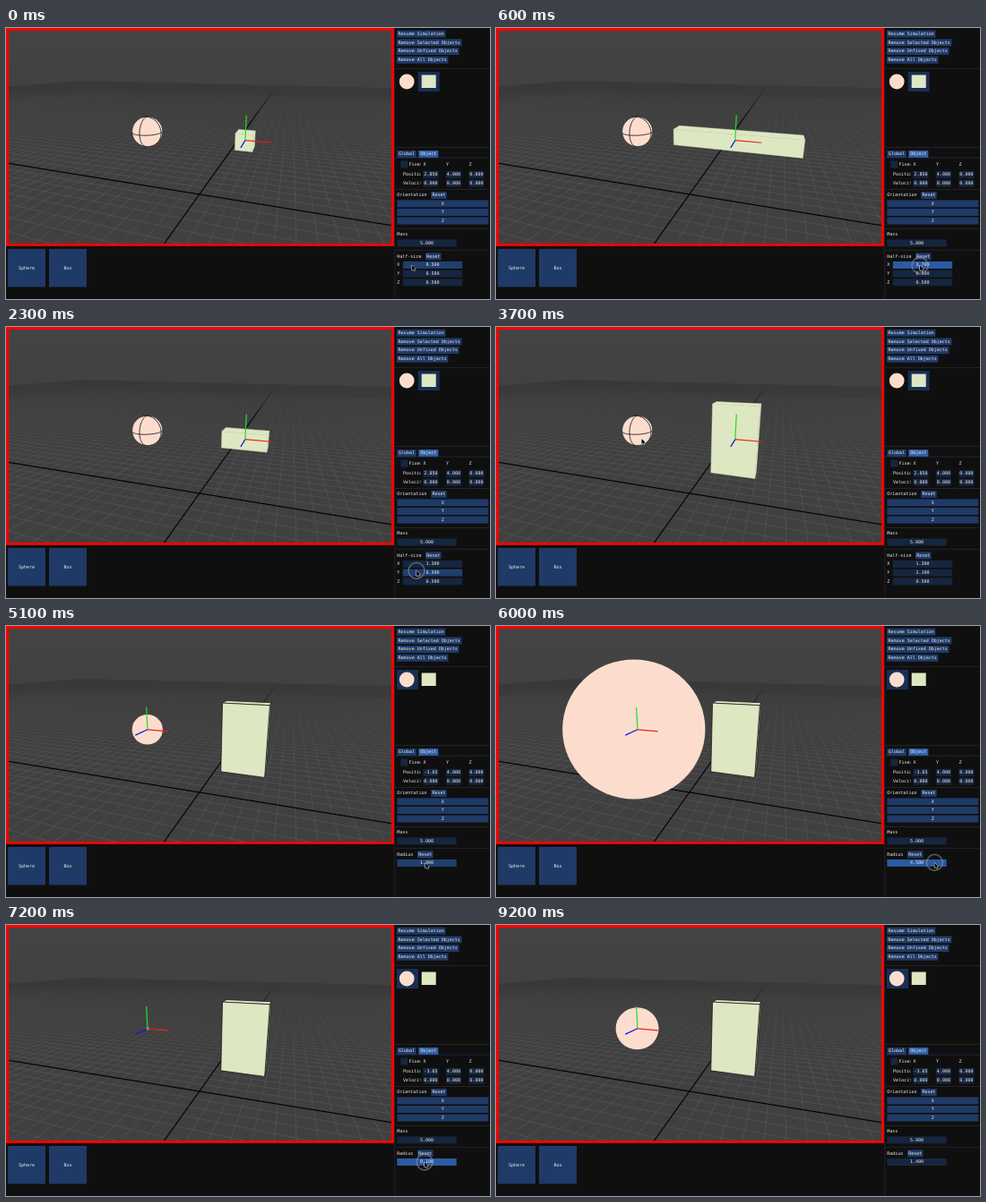
An HTML page with a canvas that plays this animation: 540 by 303 pixels, repeating every 9300 ms.

```html
<!DOCTYPE html>
<html>
<head>
<meta charset="utf-8">
<title>Physics sandbox</title>
<style>
html, body { margin: 0; width: 100%; height: 100%; overflow: hidden; background: #0f0f0f; }
canvas { display: block; width: 540px; height: 303px; }
</style>
</head>
<body>
<canvas id="stage"></canvas>
<script>
const W = 540, H = 303, LOOP = 9300, STEP = 100;
const ratio = window.devicePixelRatio || 1;
const stage = document.getElementById('stage');
const BUTTON = '#1f3a66', FIELD = '#16263f', HOVER = '#203f6e', ACTIVE = '#2b5aa3';
const PEACH = '#fcddcd', GREEN = '#dde7c2';

function sized(canvas) {
  canvas.width = W * ratio;
  canvas.height = H * ratio;
  const c = canvas.getContext('2d');
  c.scale(ratio, ratio);
  return c;
}
const ctx = sized(stage);

// Camera orbiting the point (0, 4, 0)
const FOCAL = 292, DIST = 16.3, CX = 215.8, CY = 121;
const yaw = 18.8 * Math.PI / 180, pitch = 15.3 * Math.PI / 180;
const sy = Math.sin(yaw), cy = Math.cos(yaw), sp = Math.sin(pitch), cp = Math.cos(pitch);
const eye = [DIST * sy * cp, 4 + DIST * sp, DIST * cy * cp];

function view([x, y, z]) {
  const ahead = -x * sy - z * cy, up = y - 4;
  return [x * cy - z * sy, ahead * sp + up * cp, DIST + ahead * cp - up * sp];
}
const toScreen = ([x, y, d]) => [CX + FOCAL * x / d, CY - FOCAL * y / d];
const project = p => toScreen(view(p));

function path(c, points, closed) {
  c.beginPath();
  points.forEach(p => c.lineTo(p[0], p[1]));
  if (closed) c.closePath();
}

// Line on the ground, cut at the near plane
function groundLine(c, a, b) {
  let p = view(a), q = view(b);
  const near = 1;
  if (p[2] < near && q[2] < near) return;
  const cut = (u, v) => {
    const k = (near - u[2]) / (v[2] - u[2]);
    return u.map((n, i) => n + (v[i] - n) * k);
  };
  if (p[2] < near) p = cut(p, q);
  if (q[2] < near) q = cut(q, p);
  path(c, [toScreen(p), toScreen(q)]);
  c.stroke();
}

function fade(c, y0, y1, from, to) {
  const g = c.createLinearGradient(0, y0, 0, y1);
  g.addColorStop(0, from);
  g.addColorStop(1, to);
  return g;
}

function makeScene() {
  const canvas = document.createElement('canvas');
  const c = sized(canvas);
  c.fillStyle = fade(c, 0, 70, '#444444', '#414141');
  c.fillRect(0, 0, 433, 244);
  const size = 100;
  const left = project([-size, 0, 15]), corner = project([-size, 0, -size]), right = project([size, 0, -size]);
  path(c, [left, corner, right, [right[0], 244], [left[0], 244]], true);
  c.fillStyle = fade(c, 58, 150, '#383838', '#404040');
  c.save();
  c.clip();
  c.fillRect(0, 0, 433, 244);
  c.lineWidth = 0.6;
  c.strokeStyle = fade(c, 68, 165, 'rgba(92,92,92,0)', 'rgba(92,92,92,0.85)');
  for (let i = -60; i <= 60; i++) {
    groundLine(c, [i, 0, -size], [i, 0, size]);
    groundLine(c, [-size, 0, i], [size, 0, i]);
  }
  c.lineWidth = 1.2;
  c.strokeStyle = fade(c, 66, 105, 'rgba(0,0,0,0)', '#000');
  groundLine(c, [-size, 0, 0], [size, 0, 0]);
  groundLine(c, [0, 0, -size], [0, 0, size]);
  c.restore();
  return canvas;
}
const scene = makeScene();

// Timeline
const smooth = k => k * k * (3 - 2 * k);
function track(keys, t) {
  if (t <= keys[0][0]) return keys[0].slice(1);
  for (let i = 1; i < keys.length; i++) {
    const a = keys[i - 1], b = keys[i];
    if (t <= b[0]) {
      const k = smooth((t - a[0]) / (b[0] - a[0]));
      return a.slice(1).map((v, n) => v + (b[n + 1] - v) * k);
    }
  }
  return keys[keys.length - 1].slice(1);
}
const tenth = keys => t => Math.round(track(keys, t)[0] * 10) / 10;
const halfX = tenth([[100, 0.5], [600, 3.7], [800, 4], [1700, 1.3]]);
const halfY = tenth([[2300, 0.5], [2800, 2.6], [3200, 2.1]]);
const radius = tenth([[5100, 1], [6000, 4.5], [7200, 0.1], [8300, 1.4]]);
const pointer = [
  [0, 453, 265], [100, 453, 265], [600, 473, 265.5], [800, 475, 265.5], [1700, 458, 265.5],
  [2000, 458, 272.5], [2300, 458, 272.5], [2800, 471, 273], [3200, 468, 273],
  [3700, 162.5, 125], [4100, 162.5, 125], [4900, 468, 265], [5100, 468, 265],
  [6000, 489.4, 264.5], [7200, 467, 265], [8300, 475, 265], [8500, 475, 265], [9100, 515, -14]
];
const presses = [[100, 1700], [2250, 3200], [3900, 4050], [5100, 8300]];
const pressed = t => presses.some(([a, b]) => t > a && t < b);
const SELECT_AT = 4000;
const BOX_AT = [2.85, 4, 0], BALL_AT = [-3.65, 4, 0];

function drawBox(half, selected) {
  ctx.lineJoin = 'round';
  for (let axis = 0; axis < 3; axis++) {
    for (const side of [-1, 1]) {
      if ((eye[axis] - BOX_AT[axis]) * side <= half[axis]) continue;
      const u = (axis + 1) % 3, v = (axis + 2) % 3;
      const corners = [[-1, -1], [1, -1], [1, 1], [-1, 1]].map(([a, b]) => {
        const p = BOX_AT.slice();
        p[axis] += side * half[axis];
        p[u] += a * half[u];
        p[v] += b * half[v];
        return project(p);
      });
      path(ctx, corners, true);
      ctx.fillStyle = GREEN;
      ctx.fill();
      ctx.lineWidth = selected ? 0.4 : 0.7;
      ctx.strokeStyle = selected ? GREEN : '#111';
      ctx.stroke();
    }
  }
}

function drawBall(r, selected) {
  const [x, y, d] = view(BALL_AT);
  const q = d * d - r * r, k = d * d / q;
  const rx = FOCAL * r * Math.sqrt(x * x + q) / q, ry = FOCAL * r * Math.sqrt(y * y + q) / q;
  ctx.beginPath();
  ctx.ellipse(CX + FOCAL * x / d * k, CY - FOCAL * y / d * k, rx, ry, 0, 0, 7);
  ctx.fillStyle = PEACH;
  ctx.fill();
  if (selected) return;
  ctx.strokeStyle = '#222';
  ctx.lineWidth = 0.7;
  ctx.stroke();
  ctx.lineWidth = 0.9;
  for (let axis = 0; axis < 3; axis++) {
    ctx.beginPath();
    let pen = false;
    for (let i = 0; i <= 72; i++) {
      const a = i * Math.PI / 36, p = BALL_AT.slice();
      p[(axis + 1) % 3] += r * Math.cos(a);
      p[(axis + 2) % 3] += r * Math.sin(a);
      const facing = p.reduce((s, n, j) => s + (n - BALL_AT[j]) * (eye[j] - p[j]), 0) > 0;
      const s = project(p);
      if (facing && pen) ctx.lineTo(s[0], s[1]);
      else ctx.moveTo(s[0], s[1]);
      pen = facing;
    }
    ctx.stroke();
  }
}

function drawGizmo(at) {
  ctx.lineWidth = 1.2;
  ['#f02018', '#20e020', '#1414e0'].forEach((color, axis) => {
    const tip = at.slice();
    tip[axis] += 1.5;
    path(ctx, [project(at), project(tip)]);
    ctx.strokeStyle = color;
    ctx.stroke();
  });
}

// Interface
function rect(x, y, w, h, color) {
  ctx.fillStyle = color;
  ctx.fillRect(x, y, w, h);
}
function text(s, x, y, align = 'left') {
  ctx.font = '5px "DejaVu Sans Mono", monospace';
  ctx.textBaseline = 'middle';
  ctx.textAlign = align;
  ctx.fillStyle = '#f0f0f0';
  ctx.fillText(s, x, y);
}
function button(s, x, y, w, h = 8, color = BUTTON) {
  rect(x, y, w, h, color);
  text(s, x + w / 2, y + h / 2 + 0.2, 'center');
}
function field(s, x, y, w, mouse) {
  const over = mouse && mouse.x >= x && mouse.x <= x + w && mouse.y >= y && mouse.y <= y + 8;
  button(s, x, y, w, 8, over ? (mouse.dragging ? ACTIVE : HOVER) : FIELD);
}
const rule = (y, color = '#2a2a32') => rect(434, y, 106, 0.7, color);

function drawPanel(t, ballSelected, mouse) {
  rect(433, 0, 107, H, '#0f0f0f');
  rect(0, 244, 433, 59, '#0f0f0f');
  rect(433.5, 0, 0.7, H, '#2a2a32');
  button('Sphere', 2, 247, 42, 42.5);
  button('Box', 48, 247, 42, 42.5);

  ['Resume Simulation', 'Remove Selected Objects', 'Remove Unfixed Objects', 'Remove All Objects']
    .forEach((s, i) => button(s, 436, 2.6 + i * 9.7, s.length * 3.01 + 3.2));
  rule(45);
  rect(ballSelected ? 436 : 459.7, 49, 24, 22, '#182f55');
  ctx.beginPath();
  ctx.arc(447.2, 60, 8.4, 0, 7);
  ctx.fillStyle = PEACH;
  ctx.fill();
  rect(463.7, 52.5, 16, 14.5, GREEN);
  rule(133);

  button('Global', 436.3, 137, 21.5);
  button('Object', 460.3, 137, 22, 8, '#3160a6');
  rule(144.7, '#1e3354');
  rect(440.3, 148.5, 8, 8, FIELD);
  [['X', 465.5], ['Y', 491], ['Z', 516.5]].forEach(([s, x]) => text(s, x, 152.5));
  ctx.save();
  ctx.beginPath();
  ctx.rect(434, 146, 28.5, 34);
  ctx.clip();
  text('Fixed', 449.5, 152.5);
  text('Position', 443, 164);
  text('Velocity', 443, 173.7);
  ctx.restore();
  [ballSelected ? '-3.65' : '2.850', '4.000', '0.000'].forEach((s, i) => {
    const x = 465.4 + i * 25.5;
    field(s, x, 159.8, 17);
    field('0.000', x, 169.5, 17);
  });
  rule(180);
  text('Orientation', 436.3, 187);
  button('Reset', 474.2, 183, 17.5);
  ['X', 'Y', 'Z'].forEach((s, i) => button(s, 436.3, 192.4 + i * 9.6, 102));
  rule(224);
  text('Mass', 436.3, 231);
  field('5.000', 436.3, 236.4, 66.3);
  rule(248);
  if (ballSelected) {
    text('Radius', 436.3, 255.5);
    button('Reset', 459, 251.4, 17.5);
    field(radius(t).toFixed(3), 436.3, 261, 66.3, mouse);
  } else {
    text('Half-size', 436.3, 255.5);
    button('Reset', 468, 251.4, 17.5);
    [['X', halfX(t)], ['Y', halfY(t)], ['Z', 0.5]].forEach(([s, v], i) => {
      text(s, 436.3, 265.2 + i * 9.7);
      field(v.toFixed(3), 442.8, 261 + i * 9.7, 66.3, mouse);
    });
  }
}

function drawPointer({ x, y, down }) {
  if (down) {
    ctx.beginPath();
    ctx.arc(x, y, 9, 0, 7);
    ctx.strokeStyle = 'rgba(150,150,150,0.6)';
    ctx.lineWidth = 1.4;
    ctx.stroke();
  }
  const shape = [[0, 0], [0, 6], [1.4, 4.8], [2.3, 6.8], [3.2, 6.4], [2.4, 4.5], [4.3, 4.3]];
  path(ctx, shape.map(p => [x + p[0], y + p[1]]), true);
  ctx.lineWidth = 0.9;
  ctx.strokeStyle = '#fff';
  ctx.stroke();
  ctx.fillStyle = '#000';
  ctx.fill();
}

function draw(t) {
  const ballSelected = t >= SELECT_AT;
  const [x, y] = track(pointer, t);
  // Fields react one step after the press
  const mouse = { x, y, down: pressed(t), dragging: pressed(t) && pressed(t - STEP) };
  ctx.drawImage(scene, 0, 0, W, H);
  drawBall(radius(t), ballSelected);
  drawBox([halfX(t), halfY(t), 0.5], !ballSelected);
  drawGizmo(ballSelected ? BALL_AT : BOX_AT);
  drawPanel(t, ballSelected, mouse);
  ctx.lineJoin = 'miter';
  ctx.strokeStyle = '#ff0000';
  ctx.lineWidth = 3;
  ctx.strokeRect(1.5, 1.5, 430, 241);
  drawPointer(mouse);
}

const start = performance.now();
function tick() {
  const t = (performance.now() - start) % LOOP;
  draw(Math.floor(t / STEP) * STEP);
  requestAnimationFrame(tick);
}
tick();
</script>
</body>
</html>
```
